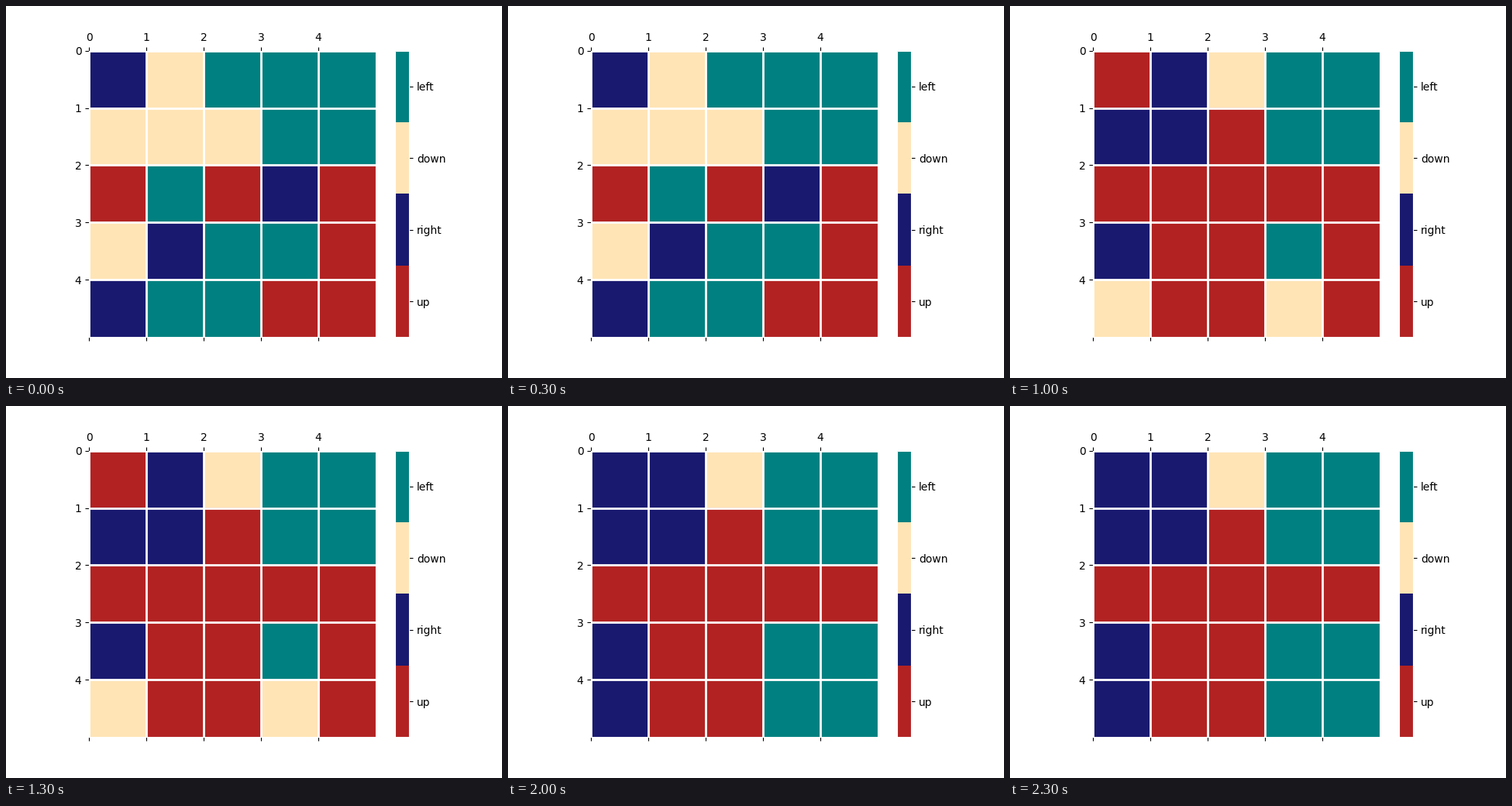
Animation, 640 px wide and 480 px high, one loop 2500 ms. Source, as a matplotlib script:

```python
import matplotlib.pyplot as plt
import numpy as np
from matplotlib.animation import FuncAnimation
from matplotlib.colors import ListedColormap

SIZE = 5
ACTIONS = ["up", "right", "down", "left"]
COLORS = ["firebrick", "midnightblue", "moccasin", "teal"]

# One letter per cell (first letter of the action), row by row.
POLICIES = [
    "rdlll dddll uluru drllu rlluu",
    "uuddd lrull uruuu luuru ddddr",
    "urdll rrull uuuuu ruulu duudu",
    "rrdll rrull uuuuu ruull ruulu",
    "rrdll rrull uuuuu ruull ruull",
]


def to_grid(policy):
    return np.array([["urdl".index(c) for c in row] for row in policy.split()])


plt.rcParams["font.family"] = "DejaVu Sans"
plt.rcParams["axes.edgecolor"] = "white"

fig, ax = plt.subplots(figsize=(6.4, 4.8), dpi=100)
image = ax.matshow(to_grid(POLICIES[0]), cmap=ListedColormap(COLORS),
                   vmin=-0.5, vmax=3.5, extent=(0, SIZE, SIZE, 0))
ax.set_xticks(range(SIZE))
ax.set_yticks(range(SIZE))
ax.grid(color="white", linewidth=2)

bar = fig.colorbar(image, ax=ax, ticks=range(len(ACTIONS)))
bar.ax.set_yticklabels(ACTIONS)
bar.outline.set_edgecolor("white")


def update(step):
    image.set_data(to_grid(POLICIES[step]))
    return [image]


anim = FuncAnimation(fig, update, frames=len(POLICIES), interval=500,
                     repeat=True, repeat_delay=0)
plt.show()
```
